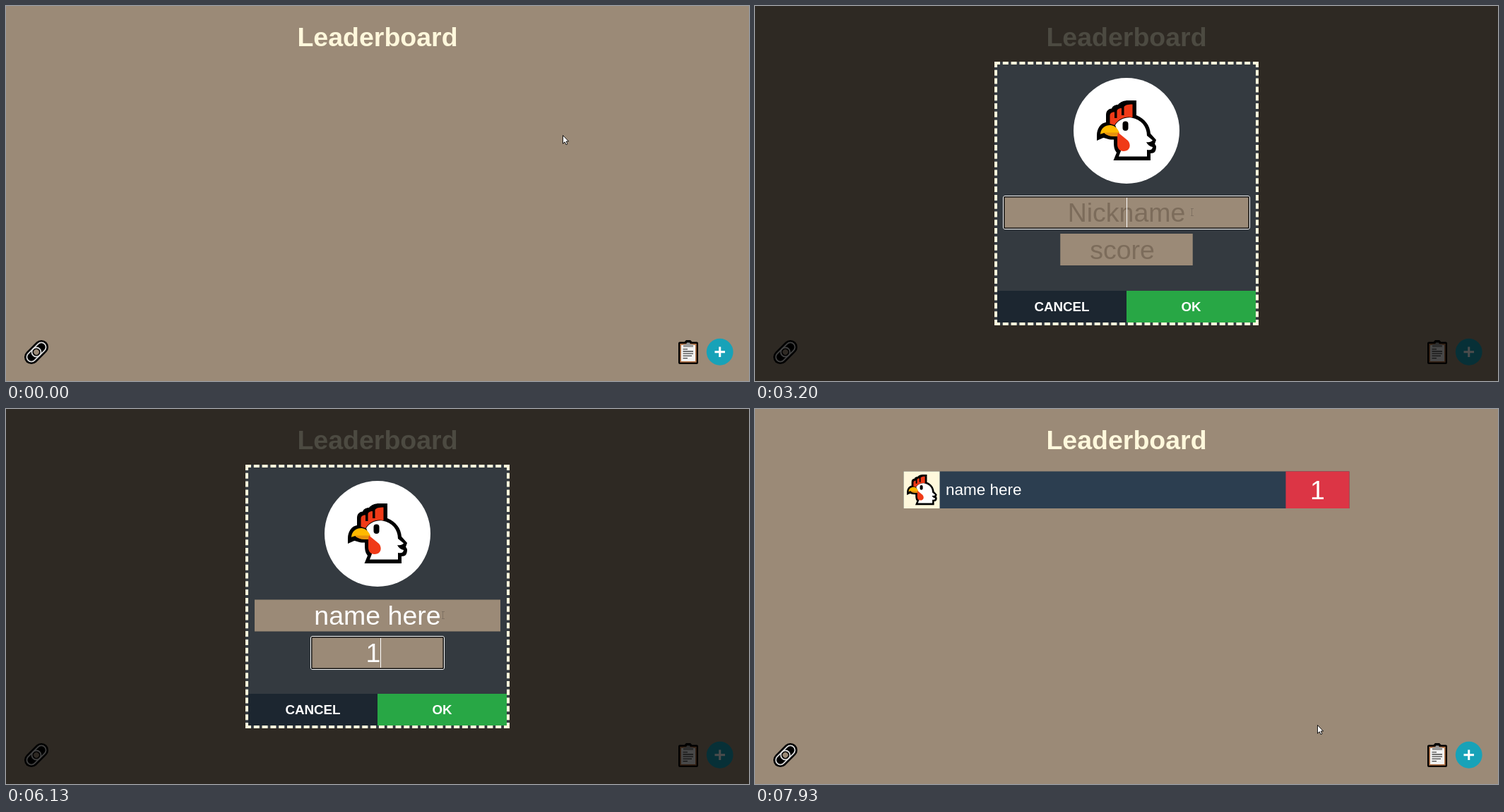
These frames come from a looping animation (1052 px wide and 532 px high, 8000 ms). An HTML page:

```html
<!DOCTYPE html>
<html lang="en">
<head>
<meta charset="utf-8">
<title>Leaderboard</title>
<style>
  html, body { margin: 0; width: 100%; height: 100%; overflow: hidden; background: #9b8a77; }
  svg { display: block; width: 100%; height: 100%; cursor: default; }
  text { font-family: "Liberation Sans", Arial, sans-serif; font-size: 37.5px; fill: #fff; white-space: pre; }
  .mid { text-anchor: middle; }
  .title { font-weight: bold; fill: #fff8dc; }
  .button { font-weight: bold; font-size: 18.75px; }
  .empty { fill: #7c6c5b; }
  .field { fill: #9b8a77; }
  .dash line { stroke: #fff8dc; stroke-width: 4; stroke-dasharray: 8 3.806; }
  .ring rect { fill: none; }
  .ring .out { stroke: #fff; }
  .ring .in { stroke: #101010; stroke-width: 1.5; }
</style>
</head>
<body>
<svg viewBox="0 0 1052 532">
  <defs>
    <g id="chicken">
      <path d="M484 191V184C484 173 490 166 497 165V155C497 149 500 146 505 145.5C506 142 510 140 514 140C517 136 523 134 528 134H540V155C552 160 559 169 560 181L568 190L566 195.5L568 199C568 206 566 209 560 209V219H507.5L512 208C508 203 508 198 508 189.5C500 190 496 187 493 187Z"/>
      <path fill="#fff" d="M510 169C515 161 524 157.5 533 158.5C547 161 555 171 555 184L563 190.5C561 193 558 193.5 554 193C556 197 559 199.500 563 200C562.5 204 560 205 555 204V213.5H515L519 203L514 180Z"/>
      <path fill="#f03a17" d="M502.5 167V156C502.5 152 505 150.5 509 150.5V159H512.5V149C513 146 516 145 519 145V155H522.5V143C524 140.5 528 139.5 534.5 139.5V158C523 156 515 160 509 169Z"/>
      <path fill="#ffb900" d="M489 182C489.5 173 496 169 503 169C509 169 514 174 516 180H496C493 180 491 181 489 182Z"/>
      <path fill="#e8930c" d="M495 179.5H515.5V185H507C502 185 498 183 495 181Z"/>
      <path fill="#f03a17" d="M514 179.5L528 191C533 197 531 206 522 206C516 206 513 202 513 196V185Z"/>
      <rect x="520.5" y="163.5" width="8" height="13.5" rx="4"/>
    </g>
  </defs>

  <rect width="1052" height="532" fill="#9b8a77"/>
  <text class="mid title" x="526" y="57">Leaderboard</text>

  <g id="row">
    <rect x="210.5" y="88.5" width="631" height="52.5" fill="#2c3e50"/>
    <rect x="210.5" y="88.5" width="51" height="52.5" fill="#fff8dc"/>
    <rect x="751.5" y="88.5" width="90" height="52.5" fill="#dc3545"/>
    <use href="#chicken" transform="translate(215 93) scale(.508) translate(-484 -134)"/>
    <text x="270" y="122" style="font-size:22.5px">name here</text>
    <text class="mid" x="796.5" y="128">1</text>
  </g>

  <g transform="translate(43 491) rotate(-45)" fill="none">
    <path d="M-10 0H10" stroke="#000" stroke-width="20" stroke-linecap="round"/>
    <g stroke="#dcdcdc" stroke-width="1.8">
      <rect x="-16.5" y="-6.5" width="23" height="13" rx="6.5"/>
      <rect x="-6.5" y="-6.5" width="23" height="13" rx="6.5"/>
    </g>
    <circle r="3.8" fill="#9b8a77"/>
  </g>

  <g>
    <path d="M954 476.5H960.5L963 474H969L971.5 476.5H978Q980 476.5 980 478.5V506Q980 508 978 508H954Q952 508 952 506V478.5Q952 476.5 954 476.5Z"/>
    <rect x="954.3" y="479" width="23.4" height="26.7" fill="#b5764a"/>
    <rect x="956" y="481" width="20" height="23" fill="#f2f2f2"/>
    <path fill="#9a9a9a" d="M959 484V480H963L964 477.5H968L969 480H973V484Z"/>
    <path stroke="#444" stroke-width="1.3" d="M958.5 486.8H965M958.5 490H973M958.5 493.2H973M958.5 496.4H971M958.5 499.6H965"/>
  </g>

  <circle cx="1010.75" cy="490.75" r="18.9" fill="#17a2b8"/>
  <path d="M1003.5 490.75H1018M1010.75 483.5V498" stroke="#fff" stroke-width="3"/>

  <g id="dialog">
    <rect width="1052" height="532" fill="#000" opacity=".7"/>
    <rect x="339" y="79" width="374" height="374" fill="#343a40"/>
    <rect x="343" y="404" width="183" height="45" fill="#1c2630"/>
    <rect x="526" y="404" width="183" height="45" fill="#28a745"/>
    <g class="dash">
      <line x1="339" y1="81" x2="713" y2="81"/>
      <line x1="339" y1="451" x2="713" y2="451"/>
      <line x1="341" y1="79" x2="341" y2="453"/>
      <line x1="711" y1="79" x2="711" y2="453"/>
    </g>
    <circle cx="526" cy="177" r="75" fill="#fff"/>
    <use href="#chicken"/>
    <rect class="field" x="352" y="270.5" width="348" height="45"/>
    <rect class="field" x="432.25" y="323" width="187.5" height="45"/>
    <g class="ring" id="nameRing">
      <rect class="out" x="351.5" y="269.5" width="349" height="47" rx="2.5"/>
      <rect class="in" x="352.75" y="270.75" width="346.5" height="44.5" rx="1.5"/>
    </g>
    <g class="ring" id="scoreRing">
      <rect class="out" x="431.5" y="322.5" width="189" height="47" rx="2.5"/>
      <rect class="in" x="432.75" y="323.75" width="186.5" height="44.5" rx="1.5"/>
    </g>
    <text class="mid" id="name" x="526" y="306"></text>
    <text class="mid" id="score" x="520" y="358.5"></text>
    <rect id="caret" width="1" height="42" fill="#fff"/>
    <text class="mid button" x="434.5" y="433">CANCEL</text>
    <text class="mid button" x="617.5" y="433">OK</text>
  </g>

  <g id="cursor">
    <path id="arrow" fill="#fff" stroke="#000" stroke-width=".9" d="M.5 .5V12.3L3.2 9.8L5 13.7L6.9 12.9L5.2 9H8.6Z"/>
    <path id="hand" fill="#fff" stroke="#000" stroke-width=".9" d="M-1.2 10V1.5C-1.2 .2 1.3 .2 1.3 1.5V6C2 5 3.7 5.4 3.8 6.5C4.6 5.7 6 6.2 6.2 7.2C7.2 6.6 8.5 7.3 8.5 8.5V12C8.5 14.5 7 15 7 17.5H-.5C-.7 15 -3 13.5 -4.3 10.5C-4.9 9 -3 8 -2.2 9Z"/>
    <path id="beam" fill="none" stroke="#7f7162" d="M-2 -4.5H2M-2 5.5H2M-.5 -4.5V5.5"/>
  </g>
</svg>
<script>
const LOOP = 8000, TICK = 1000 / 15, BLINK = 530;
const OPEN = 1870, FOCUS_NAME = 3200, FOCUS_SCORE = 5470, TYPE_SCORE = 6130, BLUR = 7200, CLOSE = 7400;
const NAME = 'name here';
const keyTimes = [3930, 4070, 4130, 4270, 4470, 4730, 4870, 5000, 5130];
const carets = [FOCUS_NAME, ...keyTimes, FOCUS_SCORE, TYPE_SCORE];

// time, x, y of the pointer's hot spot
const path = [
  [0, 788, 183], [400, 788, 183], [1267, 1012, 513], [1667, 1012, 495],
  [2400, 1012, 495], [3000, 619, 292], [6267, 619, 292], [6867, 626, 441],
  [7133, 625, 428], [7667, 625, 428], [7933, 796, 448], [8000, 796, 448]
];

const el = id => document.getElementById(id);
const show = (id, on) => { el(id).style.display = on ? '' : 'none'; };
const inside = (x, y, l, t, r, b) => x >= l && x < r && y >= t && y < b;

const pen = document.createElement('canvas').getContext('2d');
pen.font = '37.5px "Liberation Sans", Arial, sans-serif';

function pointer(t) {
  const now = Math.floor((t + 4) / TICK) * TICK;
  const i = Math.max(1, path.findIndex(p => p[0] > now));
  const [t0, x0, y0] = path[i - 1], [t1, x1, y1] = path[i];
  const k = Math.min(1, Math.max(0, (now - t0) / (t1 - t0)));
  const e = k * k * (3 - 2 * k);
  return [Math.round(x0 + (x1 - x0) * e), Math.round(y0 + (y1 - y0) * e)];
}

function drawPointer(t, open) {
  const [x, y] = pointer(t);
  const hand = !open && Math.hypot(x - 1010.75, y - 490.75) < 18.75;
  const beam = open && (inside(x, y, 352, 271, 700, 316) || inside(x, y, 432, 323, 620, 368));
  el('cursor').setAttribute('transform', `translate(${x} ${y})`);
  show('hand', hand);
  show('beam', beam);
  show('arrow', !hand && !beam);
}

function fill(id, value, hint) {
  el(id).textContent = value || hint;
  el(id).classList.toggle('empty', !value);
}

function drawForm(t) {
  const name = NAME.slice(0, keyTimes.filter(k => k <= t).length);
  const score = t >= TYPE_SCORE ? '1' : '';
  fill('name', name, 'Nickname');
  fill('score', score, 'score');

  const onName = t >= FOCUS_NAME && t < FOCUS_SCORE;
  const onScore = t >= FOCUS_SCORE && t < BLUR;
  show('nameRing', onName);
  show('scoreRing', onScore);

  const last = carets.filter(c => c <= t).pop();
  show('caret', (onName || onScore) && (t - last) % (2 * BLINK) < BLINK);
  const half = pen.measureText(onName ? name : score).width / 2;
  el('caret').setAttribute('x', Math.floor((onName ? 526 : 520) + half));
  el('caret').setAttribute('y', onName ? 272 : 325);
}

function draw(t) {
  const open = t >= OPEN && t < CLOSE;
  show('dialog', open);
  show('row', t >= CLOSE);
  if (open) drawForm(t);
  drawPointer(t, open);
}

const start = performance.now();
function frame() {
  draw((performance.now() - start) % LOOP);
  requestAnimationFrame(frame);
}
frame();
</script>
</body>
</html>
```
